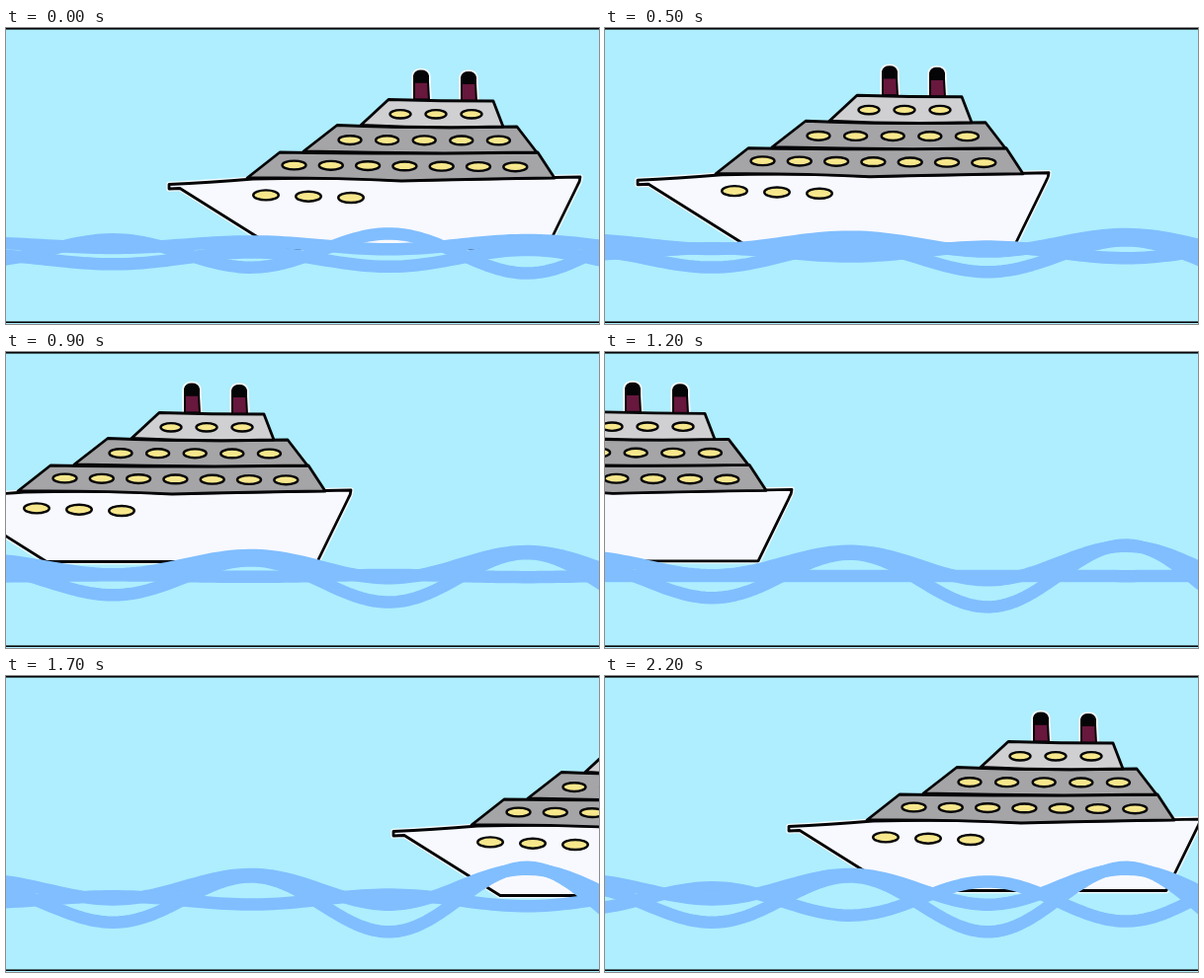
Animation, 600 px wide and 300 px high, one loop 2.4 s. Source, as an HTML page with a canvas:

```html
<!DOCTYPE html>
<html lang="en">
<head>
<meta charset="utf-8">
<title>Cruise ship</title>
<style>
html, body { margin: 0; width: 100%; height: 100%; overflow: hidden; background: #aeeefe; }
canvas { display: block; }
</style>
</head>
<body>
<canvas id="stage" width="600" height="300"></canvas>
<script>
const ctx = document.getElementById('stage').getContext('2d');
const LOOP = 2400, DRAWINGS = 14;
const SKY = '#aeeefe', SEA = '#80beff', INK = '#050507';

// Each drawing starts on a tenth of a second
const startOf = step => Math.round(step * 1.7) * 100;

// Key poses of the ship: drawing, x, y; it re-enters from the right at 9
const POSES = [
  [0, 0, 0], [2, -88, -3.5], [4, -176, -5], [5, -232, -11],
  [8, -472, -12], [9, 296, 0], [10, 227, -1], [13, 21, -6]
];

function poseAt(step) {
  const i = POSES.findIndex(p => p[0] >= step);
  const b = POSES[i], a = POSES[Math.max(0, i - 1)];
  const t = a === b ? 0 : (step - a[0]) / (b[0] - a[0]);
  return [a[1] + (b[1] - a[1]) * t, a[2] + (b[2] - a[2]) * t];
}

function strand(mid, swell) {
  ctx.beginPath();
  for (let x = -12; x <= 612; x += 6) {
    const reach = 0.55 + x / 900;
    ctx.lineTo(x, mid + swell * reach * Math.cos((x - 385) / 280 * Math.PI * 2));
  }
  ctx.strokeStyle = SEA;
  ctx.lineWidth = 12.5;
  ctx.stroke();
}

// The main swell builds up over the loop; a counter-wave fades out and back in
function waves(step) {
  const p = step / (DRAWINGS - 1);
  const t = Math.min(1, p * 1.6);
  const grow = t * t * (3 - 2 * t);
  const swell = 8 + 23 * grow;
  const counter = 19 * (2 * p - 1) ** 2;
  strand(220 - 5 * grow, swell * 0.55);
  strand(227, -counter);
  strand(234 - 5 * grow, swell);
}

function paint(path, fill, width = 2.8) {
  ctx.fillStyle = fill;
  ctx.fill(path);
  ctx.strokeStyle = INK;
  ctx.lineWidth = width;
  ctx.stroke(path);
}

function halo(path) {
  ctx.strokeStyle = '#f4fcff';
  ctx.lineWidth = 5.5;
  ctx.stroke(path);
}

const hull = new Path2D('M165 158.5Q205 156.5 250 153Q335 151 400 154.5Q490 153 581 151Q581 155 578 160L547 223.5H273L176 162.5L165 163Z');
const decks = [
  [new Path2D('M244 152L277 126Q400 128 538 126L555 152Q480 153 400 155Q320 151 244 152Z'), '#a5a5a7'],
  [new Path2D('M301 125L335 98.5Q420 102 517 100L537 126Q420 128 301 125Z'), '#a5a5a7'],
  [new Path2D('M359 98.5L387 72.5Q440 74 493 74L503 100Q430 102 359 98.5Z'), '#d0d0d3']
];

function funnel(x, y) {
  const body = new Path2D(`M${x} ${y + 11}H${x + 14}L${x + 15} ${y + 29}H${x}Z`);
  const cap = new Path2D(`M${x} ${y + 11}V${y + 5}Q${x + 1} ${y} ${x + 7} ${y}T${x + 14} ${y + 5}V${y + 11}Z`);
  halo(body);
  halo(cap);
  paint(body, '#68173d', 2);
  paint(cap, INK, 2);
}

function windows(count, x, y, gap, slope, rx, ry) {
  for (let i = 0; i < count; i++) {
    const p = new Path2D();
    p.ellipse(x + i * gap, y + i * slope, rx, ry, 0, 0, Math.PI * 2);
    paint(p, '#f7e78c', 2.4);
  }
}

function ship(x, y) {
  ctx.save();
  ctx.translate(x, y);
  halo(hull);
  funnel(413, 43.5);
  funnel(461, 45);
  paint(hull, '#f8f9fe');
  for (const [path, fill] of decks) paint(path, fill);
  windows(3, 399, 87.3, 36, 0, 10.5, 4.2);
  windows(5, 348, 113.6, 37.6, 0.1, 11.5, 4.4);
  windows(7, 291.5, 139, 37.3, 0.3, 12, 4.4);
  windows(3, 263, 169.4, 43, 1.3, 12.8, 5);
  ctx.restore();
}

function draw(now) {
  const time = now % LOOP;
  let step = DRAWINGS - 1;
  while (startOf(step) > time) step--;
  ctx.fillStyle = SKY;
  ctx.fillRect(0, 0, 600, 300);
  ctx.lineJoin = ctx.lineCap = 'round';
  ship(...poseAt(step));
  waves(step);
  ctx.fillStyle = INK;
  ctx.fillRect(0, 0, 600, 1.6);
  ctx.fillRect(0, 297.4, 600, 1.6);
}

let start;
function tick(now) {
  start ??= now;
  draw(Math.max(0, now - start));
  requestAnimationFrame(tick);
}
draw(0);
requestAnimationFrame(tick);
</script>
</body>
</html>
```
